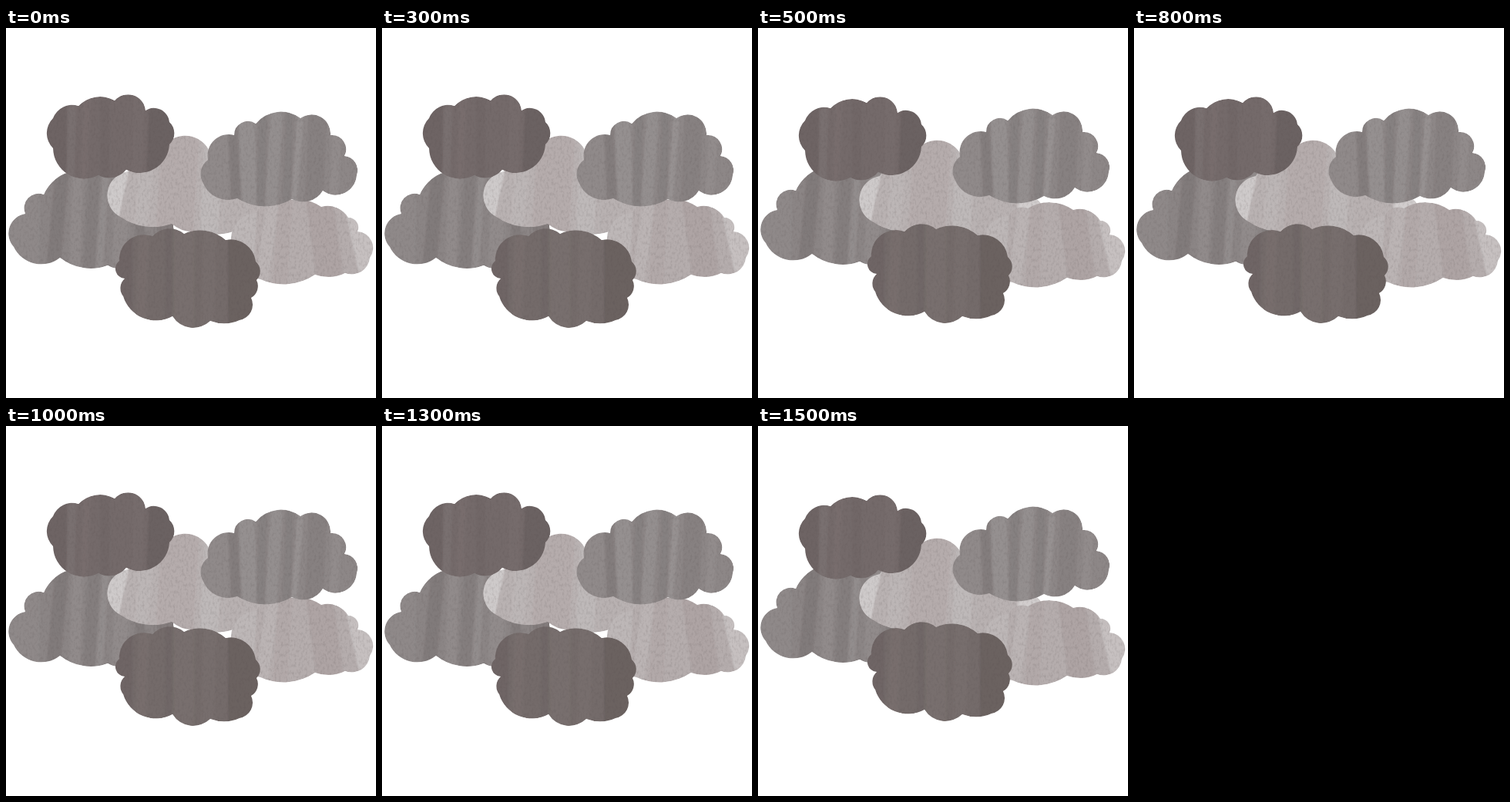
Recreate the animation shown at these times as an HTML page. Size 480 by 480 pixels, loop 2000 ms.

```html
<!DOCTYPE html>
<html lang="en">
<head>
<meta charset="utf-8">
<title>Clouds</title>
<style>
  html, body { margin: 0; width: 100%; height: 100%; overflow: hidden; background: #fff; }
  svg { display: block; width: 100vw; height: 100vh; }
</style>
</head>
<body>
<svg id="sky" viewBox="0 0 480 480">
  <defs>
    <filter id="grain" x="0" y="0" width="1" height="1" color-interpolation-filters="sRGB">
      <feTurbulence type="fractalNoise" baseFrequency=".35 .22" numOctaves="3" seed="4"/>
      <feColorMatrix values="0 0 0 0 .3  0 0 0 0 .27  0 0 0 0 .27  .9 0 0 0 -.4"/>
    </filter>
    <filter id="soft" x="-.2" width="1.4"><feGaussianBlur stdDeviation="1.2 0"/></filter>
  </defs>
</svg>
<script>
const sky = document.getElementById('sky');

// edge: cusps clockwise as [x, y, bulge of the arc to the next cusp]
// bands: [x, width, lean, color, opacity]
const clouds = [
  { dy: -5, fill: '#8b8585',
    edge: [[25,241,.33],[49,216,.2],[115,188,.15],[152,190,.2],[188,220,.2],[217,258,.2],[200,298,.2],
      [150,311,.1],[132,308,.13],[70,298,.24],[10,284,.3]],
    bands: [[4,40,0,'#938e8e',.5],[58,18,8,'#7c7575',.6],[84,14,3,'#969090',.6],[103,16,5,'#7f7979',.5],
      [121,9,6,'#989393',.6],[140,20,3,'#979292',.5],[168,12,0,'#7d7777',.6],[196,24,0,'#7e7777',.6]] },
  { dy: 6, fill: '#b9b2b2',
    edge: [[158,186,.15],[200,162,.32],[263,158,.2],[312,182,.2],[345,214,.35],[367,238,.08],[295,264,.08],
      [245,264,.1],[215,254,.12],[148,245,.36]],
    bands: [[120,34,17,'#d0cccc',.95],[170,18,6,'#bfb9b9',.6],[198,48,5,'#b5abab',.8],
      [254,24,4,'#c0bbbb',.8],[282,30,0,'#b8b1b1',.6],[338,40,6,'#d5d2d2',.9]] },
  { dy: 4, fill: '#b5adad',
    edge: [[292,272,.2],[325,240,.2],[350,230,.15],[409,232,.17],[444,246,.28],[456,264,.3],[472,298,.25],
      [440,318,.1],[401,320,.13],[330,326,.2]],
    bands: [[285,38,4,'#c0bbbb',.75],[331,16,10,'#beb8b8',.7],[350,18,5,'#b2a8a8',.7],
      [396,36,-10,'#aca2a2',.75],[449,40,-16,'#c8c3c3',.9]] },
  { dy: -4, fill: '#8d8787',
    edge: [[262,171,.28],[296,139,.3],[324,124,.2],[382,117,.32],[421,139,.3],[439,166,.25],[455,191,.3],
      [411,211,.2],[371,222,.14],[300,221,.2],[256,202,.2]],
    bands: [[252,36,0,'#938d8d',.6],[290,12,-4,'#7e7777',.6],[304,20,-3,'#9a9595',.65],[326,12,2,'#817b7b',.5],
      [340,15,5,'#999494',.65],[360,12,3,'#817b7b',.5],[374,8,6,'#9b9696',.7],[390,24,4,'#837d7d',.55],
      [422,12,5,'#979191',.5]] },
  { dy: 3, fill: '#746a6a',
    edge: [[61,117,.2],[94,101,.17],[141,94,.33],[181,107,.28],[212,122,.22],[212,151,.27],[156,184,.18],
      [120,191,.28],[61,156,.21]],
    bands: [[50,28,0,'#6c6262',.7],[80,10,2,'#7d7474',.6],[98,10,3,'#7b7171',.5],[122,12,0,'#6d6363',.4],
      [164,14,2,'#7a7070',.4],[184,40,3,'#685e5e',.7]] },
  { dy: -6, fill: '#746b6a',
    edge: [[147,302,.27],[190,270,.2],[231,267,.15],[285,275,.22],[324,303,.22],[325,327,.2],[318,350,.25],
      [303,379,.1],[265,380,.24],[216,374,.24],[152,348,.2],[154,325,.35]],
    bands: [[140,24,0,'#6c6262',.6],[170,14,3,'#7b7271',.5],[206,10,0,'#6c6363',.4],[218,26,0,'#7b7371',.6],
      [254,18,2,'#7a7170',.5],[288,46,0,'#685e5d',.75]] }
];

function add(parent, tag, attrs) {
  const el = document.createElementNS(sky.namespaceURI, tag);
  for (const key in attrs) el.setAttribute(key, attrs[key]);
  return parent.appendChild(el);
}

function outline(edge) {
  const arcs = edge.map(([x, y, h], i) => {
    const [u, v] = edge[(i + 1) % edge.length];
    const r = Math.hypot(u - x, v - y) * (.25 + h * h) / (2 * h);
    return `A${r} ${r} 0 0 1 ${u} ${v}`;
  });
  return `M${edge[0][0]} ${edge[0][1]}${arcs.join('')}Z`;
}

clouds.forEach(({ dy, fill, edge, bands }, i) => {
  const d = outline(edge);
  add(add(sky, 'clipPath', { id: 'clip' + i }), 'path', { d });
  const g = add(sky, 'g', {});
  const body = add(g, 'g', { 'clip-path': `url(#clip${i})` });
  add(body, 'path', { d, fill });

  const ys = edge.map(p => p[1]), xs = edge.map(p => p[0]);
  const top = Math.min(...ys) - 25, bottom = Math.max(...ys) + 25;
  const left = Math.min(...xs) - 25, right = Math.max(...xs) + 25;
  for (const [x, w, lean, color, opacity] of bands) {
    add(body, 'path', {
      d: `M${x + lean} ${top}h${w}L${x + w - lean} ${bottom}h${-w}Z`,
      fill: color, opacity, filter: 'url(#soft)'
    });
  }
  add(body, 'rect', {
    x: left, y: top, width: right - left, height: bottom - top,
    filter: 'url(#grain)', opacity: .4
  });

  g.animate([
    { transform: 'translateY(0px)', offset: 0, easing: 'step-end' },
    { transform: `translateY(${dy}px)`, offset: .5, easing: 'step-end' },
    { transform: 'translateY(0px)', offset: 1 }
  ], { duration: 1000, iterations: Infinity });
});
</script>
</body>
</html>
```
